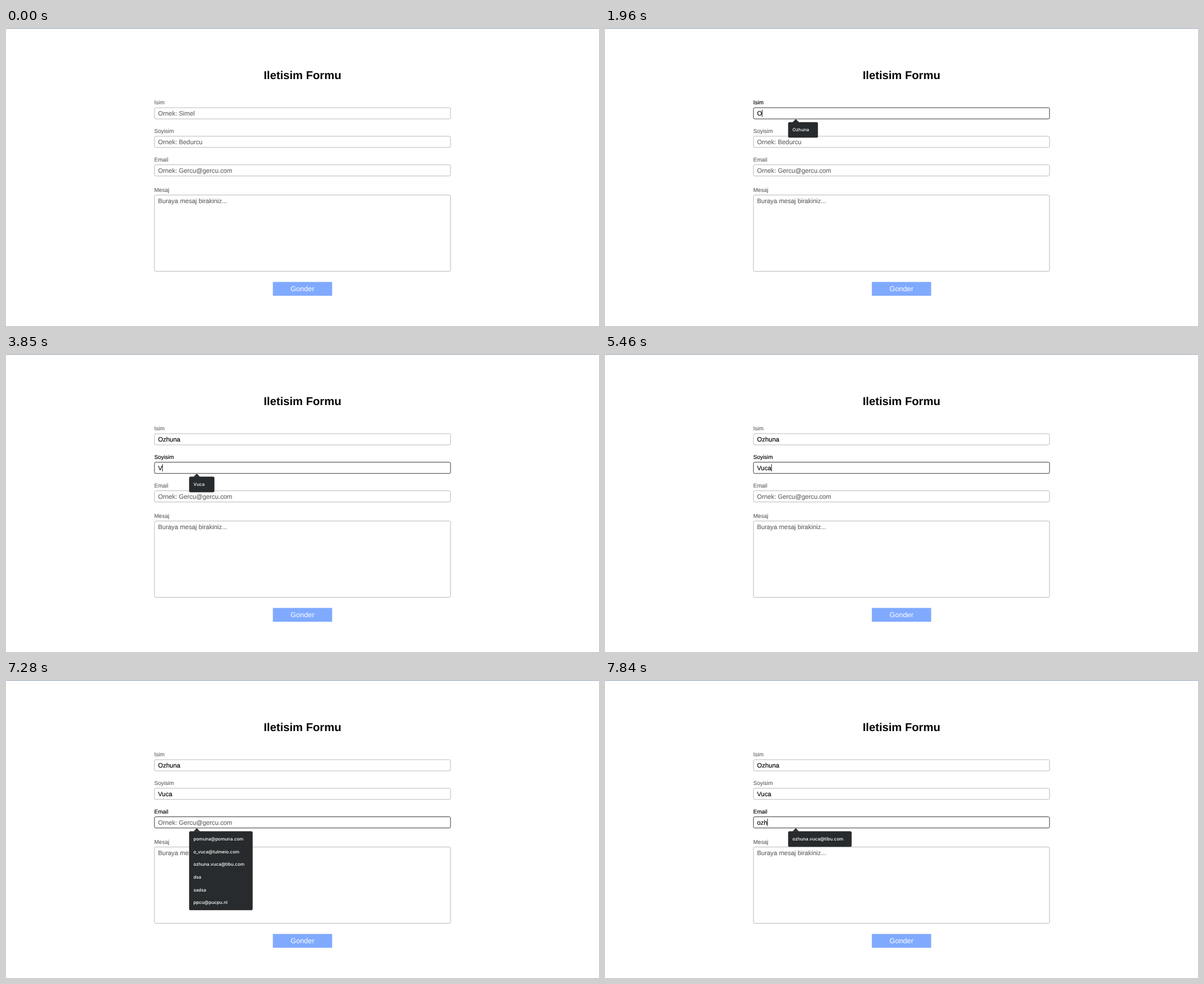
Animation of 1055x531 px, one loop 8000 ms. Source, as an HTML page:

```html
<!DOCTYPE html>
<html lang="tr">
<head>
<meta charset="utf-8">
<title>Iletisim Formu</title>
<style>
  html, body { margin: 0; width: 100%; height: 100%; overflow: hidden; background: #fff; }
  svg { display: block; width: 1055px; height: 531px; }
  text { font-family: "Liberation Sans", Arial, sans-serif; text-rendering: geometricPrecision; white-space: pre; }
  .title { font-size: 20.2px; font-weight: 700; text-anchor: middle; }
  .label, .value { stroke-width: .15; }
  .label { font-size: 10px; fill: #666; stroke: #666; }
  .value { font-size: 11.3px; fill: #000; stroke: #000; }
  .value.hint { fill: #666; stroke: #666; }
  .box { fill: #fff; stroke: #b8b8b8; stroke-width: 1; }
  .focus .label { fill: #000; stroke: #000; }
  .focus .box { stroke: #333; }
  .button { font-size: 12.7px; fill: #fff; text-anchor: middle; }
  .item { font-family: Inter, Roboto, sans-serif; font-size: 8px; font-weight: 500; fill: #fff; }
  .menu { fill: #272b2d; }
  .shade { fill: #000; opacity: .14; }
</style>
</head>
<body>
<svg id="stage" viewBox="0 0 1055 531" xmlns="http://www.w3.org/2000/svg"></svg>
<script>
const LOOP = 8000, TICK = 70, BLINK = 525;
const WIDTH = 1055, FORM = WIDTH / 2, LEFT = WIDTH / 4;
const TEXT_X = 270.5, FIRST_ROW = 152, ROW = 50.85, ITEM = 22.6;
const stage = document.getElementById("stage");

// "keys" holds the moment each letter is typed; a clicked field opens its menu at once.
const FIELDS = [
  { label: "Isim", hint: "Ornek: Simel", value: "Ozhuna",
    focus: 1010, clicked: true, keys: [1960, 2170, 2240, 2520, 2590, 2730],
    menuWidth: 53, items: ["Ozhuna", "test"] },
  { label: "Soyisim", hint: "Ornek: Bedurcu", value: "Vuca",
    focus: 2900, clicked: false, keys: [3850, 4060, 4200, 4370],
    menuWidth: 45, items: ["Vuca"] },
  { label: "Email", hint: "Ornek: Gercu@gercu.com", value: "ozhuna.vuca@tibu.com",
    focus: 5650, clicked: true, keys: [7630, 7770, 7840],
    menuWidth: 113, items: ["pomuna@pomuna.com", "o_vuca@tulmeio.com", "ozhuna.vuca@tibu.com", "dsa", "sadsa", "ppcu@pucpu.nl"] }
];

function add(parent, tag, attrs, text) {
  const el = document.createElementNS("http://www.w3.org/2000/svg", tag);
  for (const key in attrs) el.setAttribute(key, attrs[key]);
  if (text !== undefined) el.textContent = text;
  parent.appendChild(el);
  return el;
}

function addField(label, hint, top, height) {
  const group = add(stage, "g", {});
  add(group, "text", { class: "label", x: LEFT, y: top - 5.9 }, label);
  add(group, "rect", { class: "box", x: LEFT + .4, y: top, width: FORM - .8, height, rx: 2.4 });
  const text = add(group, "text", { class: "value hint", x: TEXT_X, y: top + 14 }, hint);
  return { group, text };
}

add(stage, "rect", { width: WIDTH, height: 1, fill: "#8797a6" });
add(stage, "text", { class: "title", x: WIDTH / 2, y: 91 }, "Iletisim Formu");
FIELDS.forEach((f, i) => {
  f.mid = FIRST_ROW + ROW * i;
  Object.assign(f, addField(f.label, f.hint, f.mid - 10, 20));
});
addField("Mesaj", "Buraya mesaj birakiniz...", 297.6, 136);
add(stage, "rect", { x: (WIDTH - FORM / 5) / 2, y: 452.5, width: FORM / 5, height: 24.6, fill: "#80aaff" });
add(stage, "text", { class: "button", x: WIDTH / 2, y: 469.3 }, "Gonder");
const caret = add(stage, "rect", { width: .9, height: 13, fill: "#000" });
const menu = add(stage, "g", {});

function drawMenu(field, items) {
  menu.replaceChildren();
  if (!items.length) return;
  const top = field.mid + 15.7;
  const box = { x: 325.8, width: field.menuWidth, height: 5 + ITEM * items.length, rx: 2.6 };
  add(menu, "rect", { ...box, class: "shade", y: top + 1 });
  add(menu, "rect", { ...box, class: "menu", y: top });
  add(menu, "path", { class: "menu", d: `M333.6 ${top + .3}l5.8 -5.7l5.8 5.7Z` });
  items.forEach((item, i) =>
    add(menu, "text", { class: "item", x: 333.5, y: top + 16.7 + ITEM * i }, item));
}

function show(t) {
  const active = FIELDS.findLast(f => f.focus <= t);
  for (const f of FIELDS) {
    f.typed = f.value.slice(0, f.keys.filter(k => k <= t).length);
    // A finished field keeps its whole value.
    f.group.setAttribute("class", f === active ? "focus" : "");
    f.text.setAttribute("class", f.typed ? "value" : "value hint");
    f.text.textContent = f.typed || f.hint;
  }
  if (!active) {
    caret.setAttribute("visibility", "hidden");
    return drawMenu(null, []);
  }
  const { typed, value, items, clicked, keys, focus, mid, text } = active;
  const last = keys.findLast(k => k <= t) ?? focus;
  const lit = Math.floor((t - last) / BLINK) % 2 === 0;
  caret.setAttribute("visibility", lit ? "visible" : "hidden");
  caret.setAttribute("x", TEXT_X - .1 + (typed ? text.getComputedTextLength() : 0));
  caret.setAttribute("y", mid - 6.5);
  const open = typed ? typed !== value : clicked;
  drawMenu(active, open ? items.filter(s => s.startsWith(typed)) : []);
}

const start = performance.now();
let shown;

function frame() {
  const t = Math.floor((performance.now() - start) % LOOP / TICK) * TICK;
  if (t !== shown) show(shown = t);
  requestAnimationFrame(frame);
}
frame();
</script>
</body>
</html>
```
